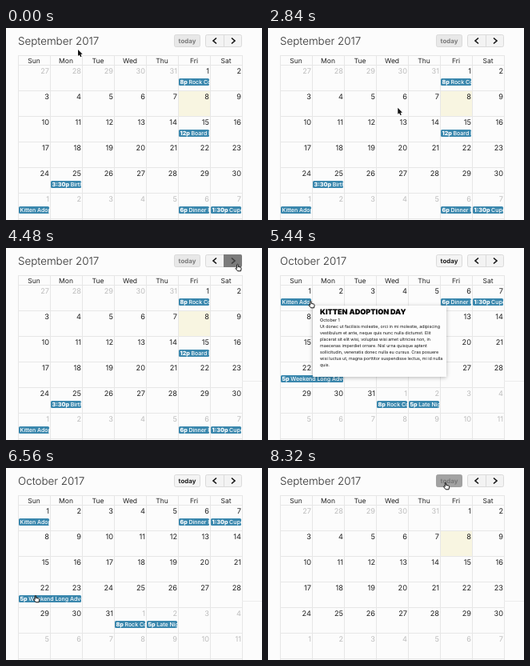
Recreate the animation shown at these times as an HTML page with a canvas. Size 320 px wide and 240 px high, loop 8.36 s.

```html
<!DOCTYPE html>
<html lang="en">
<head>
<meta charset="utf-8">
<title>Event calendar</title>
<style>
  html, body { margin: 0; width: 100%; height: 100%; overflow: hidden; background: #fcfcfc; }
  canvas { display: block; width: 320px; height: 240px; }
</style>
</head>
<body>
<canvas id="stage" width="320" height="240"></canvas>
<script>
const ctx = document.getElementById('stage').getContext('2d');
const LOOP = 8360, LEFT = 15, TOP = 47, COL = 40, ROW = 32;
const NEXT_CLICK = 4520, OCT_LOADED = 4920, TODAY_CLICK = 8020;
const LINE = '#e7e7e7';
const DAYS = ['Sun', 'Mon', 'Tue', 'Wed', 'Thu', 'Fri', 'Sat'];

const september = {
  title: 'September 2017', before: 31, lead: 5, length: 30,
  events: [
    [5, 0, 1, '8p', 'Rock Concert'], [5, 2, 1, '12p', 'Board Meeting'],
    [1, 4, 1, '3:30p', 'Birthday Party'], [0, 5, 1, '', 'Kitten Adoption Day'],
    [5, 5, 1, '6p', 'Dinner Party'], [6, 5, 1, '1:30p', 'Cupcake Tasting'],
  ],
};
const october = {
  title: 'October 2017', before: 30, lead: 0, length: 31,
  events: [
    [0, 0, 1, '', 'Kitten Adoption Day'], [5, 0, 1, '6p', 'Dinner Party'],
    [6, 0, 1, '1:30p', 'Cupcake Tasting'], [0, 3, 2, '5p', 'Weekend Long Adventure'],
    [3, 4, 1, '8p', 'Rock Concert'], [4, 4, 1, '5p', 'Late Night Show'],
  ],
};

const LOREM = [
  'Ut donec ut facilisis molestie, orci in mi molestie, adipiscing',
  'vestibulum et ante, neque quis nunc nulla dictumst. Elit',
  'placerat sit elit wisi, voluptas wisi amet ultricies non, in',
  'maecenas imperdiet ornare. Nisl urna quisque aptent',
  'sollicitudin, venenatis donec nulla eu cursus. Cras posuere',
  'wisi luctus ut, magna porttitor suspendisse lectus, mi id nulla',
  'quis.',
];
// start, end, x, y, title, date
const POPUPS = [
  [2040, 2640, 75, 200, 'BIRTHDAY PARTY', 'September 25'],
  [3120, 3680, 231, 76, 'ROCK CONCERT', 'September 1'],
  [5280, 6000, 56, 72, 'KITTEN ADOPTION DAY', 'October 1'],
  [6600, 6860, 40, 168, 'WEEKEND LONG ADVENTURE', 'October 22'],
];
// time, x, y of the pointer tip
const PATH = [
  [0, 90, 27], [960, 90, 27], [1160, 84, 56], [1560, 66, 156], [1760, 65, 173],
  [2000, 72, 194], [2640, 72, 194], [2840, 162, 100], [3080, 228, 69], [3640, 228, 69],
  [3900, 256, 44], [4200, 288, 20], [4600, 288, 20], [4900, 170, 42], [5240, 52, 66],
  [6000, 52, 66], [6200, 46, 112], [6440, 35.5, 159], [6840, 35.5, 159], [7200, 120, 98],
  [7640, 220, 27], [7800, 220.5, 18], [LOOP, 220.5, 18],
];
// intervals in which the pointer is a hand
const HAND = [[1980, 2660], [3060, 3660], [4140, 4640], [5200, 6040], [6420, 6880], [7680, LOOP]];

const within = (t, [a, b]) => t >= a && t < b;

function text(str, x, y, size, weight, color, align = 'left') {
  ctx.font = `${weight} ${size}px Inter, sans-serif`;
  ctx.textAlign = align;
  ctx.fillStyle = color;
  ctx.fillText(str, x, y);
}

function rect(x, y, w, h, color) {
  ctx.fillStyle = color;
  ctx.fillRect(x, y, w, h);
}

function pill(x, y, w, h, r, fill, stroke) {
  ctx.beginPath();
  ctx.roundRect(x, y, w, h, r);
  ctx.fillStyle = fill;
  ctx.fill();
  if (stroke) {
    ctx.strokeStyle = stroke;
    ctx.lineWidth = 1;
    ctx.stroke();
  }
}

function chevron(x, dir, color) {
  ctx.beginPath();
  ctx.moveTo(x + 2 * dir, 12.5);
  ctx.lineTo(x - 2 * dir, 16);
  ctx.lineTo(x + 2 * dir, 19.5);
  ctx.strokeStyle = color;
  ctx.lineWidth = 1.6;
  ctx.stroke();
}

function toolbar(month, t) {
  const isSept = month === september;
  const overToday = t >= 7700, overNext = within(t, [4160, 4640]);
  let fill = isSept ? '#e8e8e8' : '#f4f4f4', ink = isSept ? '#7c7c7c' : '#222';
  if (overToday) [fill, ink] = isSept ? ['#a2a2a2', '#777'] : ['#808080', '#333'];
  text(month.title, 15, 21.2, 13.4, 300, '#2c2c2c');
  pill(210.5, 8.5, 32, 15, 2, fill, overToday ? '#a0a0a0' : '#dadada');
  text('today', 226.5, 18.8, 7.9, 700, ink, 'center');
  pill(249.5, 8.5, 45, 15, 2, '#f3f3f3', '#dadada');
  if (overNext) pill(272, 8, 23, 16, [0, 2, 2, 0], '#7b7b7b');
  else rect(272, 9, 1, 14, '#dadada');
  chevron(261, 1, '#111');
  chevron(284, -1, overNext ? '#3c3c3c' : '#111');
}

function grid(month) {
  if (month === september) rect(LEFT + 5 * COL, TOP + ROW, COL, ROW, '#f8f5e1');
  for (let i = 0; i <= 7; i++) rect(LEFT + i * COL, 34, 1, 206, LINE);
  rect(LEFT, 34, 280, 1, LINE);
  for (let i = 0; i <= 6; i++) rect(LEFT, TOP - 1 + i * ROW, 280, 1, LINE);
  DAYS.forEach((day, i) => text(day, LEFT + 20 + i * COL, 43.5, 8.5, 400, '#222', 'center'));
  for (let i = 0; i < 42; i++) {
    let n = i - month.lead + 1;
    const outside = n < 1 || n > month.length;
    if (n < 1) n += month.before;
    else if (n > month.length) n -= month.length;
    text(n, LEFT + 39 + (i % 7) * COL, TOP + 10 + Math.floor(i / 7) * ROW,
      9.2, 400, outside ? '#bdbdbd' : '#222', 'right');
  }
}

function eventBar([col, row, span, time, name]) {
  const x = LEFT + 1 + col * COL, y = TOP + 16 + row * ROW, w = span * COL - 2;
  ctx.save();
  pill(x, y, w, 9, 1.5, '#3a87ad');
  ctx.clip();
  let tx = x + 1.5;
  if (time) {
    text(time, tx, y + 7, 7.2, 800, '#fff');
    tx += ctx.measureText(time).width + 1.6;
  }
  text(name, tx, y + 7, 7, 500, '#fff');
  ctx.restore();
}

function popup([start, end, x, y, title, date], t) {
  const fade = 120;
  const alpha = Math.min((t - start) / fade, 1 - (t - end) / fade, 1);
  if (alpha <= 0) return;
  ctx.save();
  ctx.globalAlpha = alpha;
  ctx.shadowColor = 'rgba(0,0,0,0.28)';
  ctx.shadowBlur = 5;
  ctx.shadowOffsetY = 1;
  rect(x, y, 167, 89, '#fdfdfd');
  ctx.shadowColor = 'transparent';
  text(title, x + 9, y + 11.2, 9.1, 900, '#000');
  text(date, x + 9, y + 20.2, 5.5, 400, '#111');
  LOREM.forEach((line, i) => text(line, x + 9, y + 28.2 + i * 8, 5.35, 400, '#111'));
  ctx.restore();
}

function pointerAt(t) {
  const i = PATH.findIndex(p => p[0] > t);
  const [t0, x0, y0] = PATH[i - 1], [t1, x1, y1] = PATH[i];
  const k = (t - t0) / (t1 - t0);
  return [x0 + (x1 - x0) * k, y0 + (y1 - y0) * k];
}

const ARROW = new Path2D('M0 0V8L1.8 6.4L3.1 9.2L4.5 8.6L3.3 5.8H5.7Z');
const GLOVE = new Path2D('M.7 .8Q1.5 -.2 2.2 .8V3.4L5.3 4.1Q6.3 4.4 6.1 5.8L5.5 8.8H1.7L-1 5.6Q-1 4.6 .1 5L.7 5.4Z');

function pointer(t) {
  const hand = HAND.some(span => within(t, span));
  const [x, y] = pointerAt(t);
  ctx.save();
  ctx.translate(x, y);
  ctx.lineJoin = 'round';
  ctx.lineWidth = hand ? 1 : 1.2;
  ctx.strokeStyle = hand ? '#111' : '#fff';
  ctx.fillStyle = hand ? '#fff' : '#111';
  if (hand) {
    ctx.fill(GLOVE);
    ctx.stroke(GLOVE);
  } else {
    ctx.stroke(ARROW);
    ctx.fill(ARROW);
  }
  ctx.restore();
}

function draw(now) {
  const t = now % LOOP;
  const month = within(t, [NEXT_CLICK, TODAY_CLICK]) ? october : september;
  const loaded = t < NEXT_CLICK || within(t, [OCT_LOADED, TODAY_CLICK]);
  ctx.textRendering = 'geometricPrecision';
  rect(0, 0, 320, 240, '#fcfcfc');
  toolbar(month, t);
  grid(month);
  if (loaded) month.events.forEach(eventBar);
  // faint trace left beside the grid by the closed popup
  if (t >= 3800) rect(295, 166, 25, 1, '#ececec');
  POPUPS.forEach(p => popup(p, t));
  pointer(t);
}

const began = performance.now();
function tick() {
  draw(performance.now() - began);
  requestAnimationFrame(tick);
}
tick();
</script>
</body>
</html>
```
